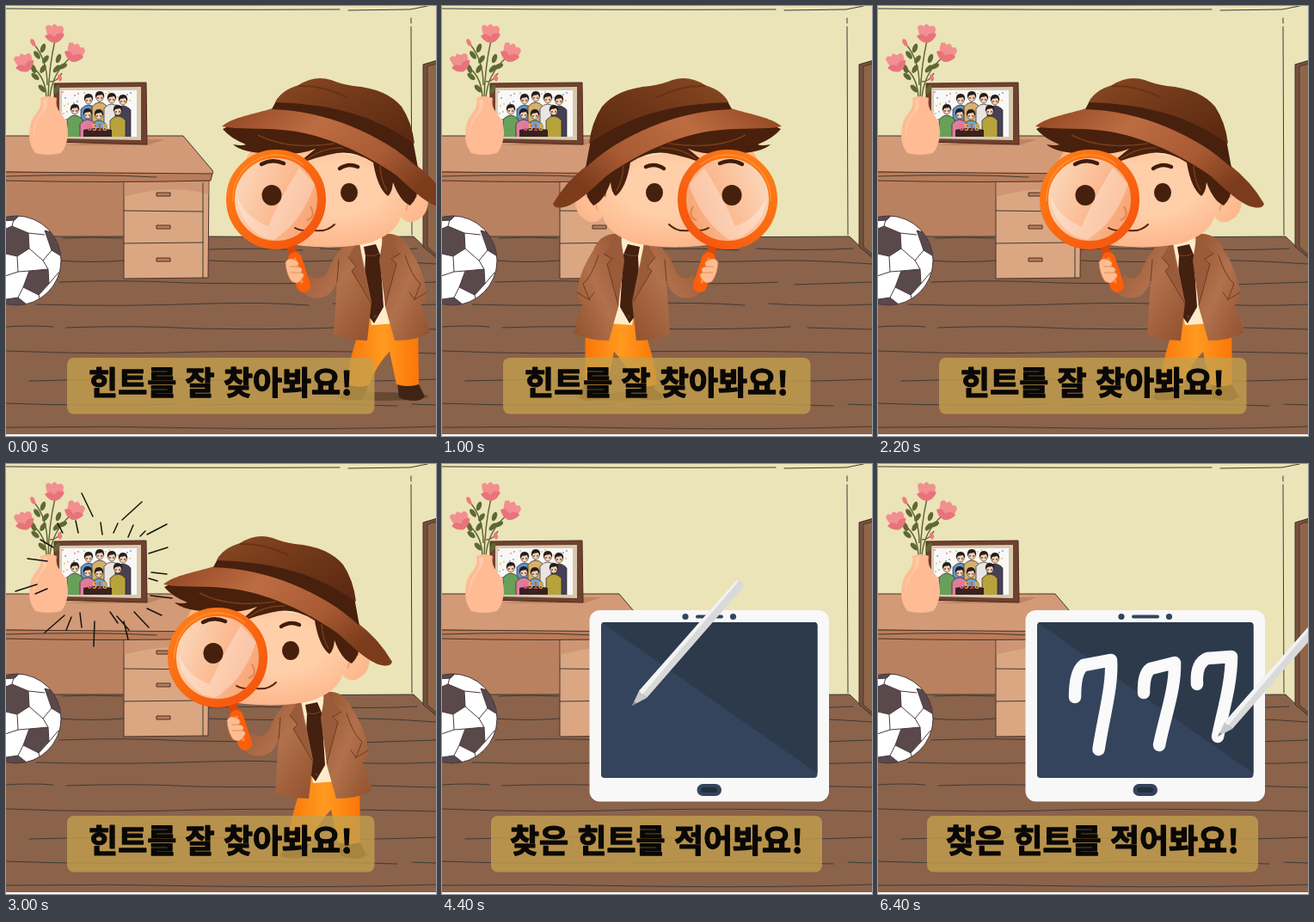
Recreate the animation shown at these times as an HTML page. Size 500x500 px, loop 7.2 s.

```html
<!DOCTYPE html>
<html lang="ko">
<head>
<meta charset="utf-8">
<title>힌트 찾기</title>
<style>
html, body { margin: 0; width: 100%; height: 100%; overflow: hidden; background: #fff; }
svg { display: block; width: 100vw; height: 100vh; }
.line { fill: none; stroke: #3b3c36; stroke-width: 1; stroke-linecap: round; stroke-linejoin: round; }
.thick { stroke: #3f1c0a; stroke-width: 4.5; }
.smile { stroke: #54220e; stroke-width: 2; }
.ink path { fill: none; stroke: #fafafa; stroke-width: 14.5; stroke-linecap: round; stroke-linejoin: round; }
text { font-family: "Noto Sans CJK KR", "Noto Sans CJK", "Noto Sans CJK JP", sans-serif; text-anchor: middle; }
.caption { font-size: 37px; font-weight: 900; fill: #0a0806; stroke: #0a0806; stroke-width: 1.3; stroke-linejoin: round; }
.banner { fill: #c4a04e; fill-opacity: .78; }
</style>
</head>
<body>
<svg viewBox="0 0 500 500" preserveAspectRatio="none">
<defs>
  <linearGradient id="crown" x1="0" y1="0" x2="1" y2=".8"><stop stop-color="#8a4a24"/><stop offset=".45" stop-color="#743a1a"/><stop offset="1" stop-color="#5c2a12"/></linearGradient>
  <linearGradient id="brim" x1="0" y1="0" x2="1" y2=".5"><stop stop-color="#8f4420"/><stop offset=".4" stop-color="#bd6c42"/><stop offset=".75" stop-color="#a85a33"/><stop offset="1" stop-color="#7c3c1c"/></linearGradient>
  <linearGradient id="coat" x1="0" y1="0" x2="1" y2="1"><stop stop-color="#95542f"/><stop offset=".5" stop-color="#b1714c"/><stop offset="1" stop-color="#92502d"/></linearGradient>
  <radialGradient id="skin" cx=".5" cy=".45" r=".6"><stop offset=".4" stop-color="#ffcfa9"/><stop offset="1" stop-color="#fdb286"/></radialGradient>
  <linearGradient id="glass" x1="0" y1=".3" x2="1" y2=".7"><stop stop-color="#fbd9bd"/><stop offset=".45" stop-color="#fbbf98"/><stop offset="1" stop-color="#f7a271"/></linearGradient>
  <linearGradient id="ring" x1="0" y1="0" x2="1" y2="1"><stop stop-color="#ff8018"/><stop offset="1" stop-color="#f4520c"/></linearGradient>
  <linearGradient id="pants" x1="0" y1="0" x2="1" y2="0"><stop stop-color="#fb7608"/><stop offset=".5" stop-color="#ff9a20"/><stop offset="1" stop-color="#fb7608"/></linearGradient>
  <clipPath id="screen"><rect x="185" y="184" width="251.500" height="181" rx="4"/></clipPath>
  <clipPath id="ballClip"><circle cx="12" cy="296" r="52"/></clipPath>
  <clipPath id="photoClip"><rect x="65" y="98" width="87" height="54"/></clipPath>
  <clipPath id="stage"><rect width="500" height="498"/></clipPath>
  <g id="flower">
    <path fill="#f29090" d="M-10-9Q-6-13-3-9Q0-15 4-9Q9-12 11-7Q11 5 2 9Q-8 8-10-9Z"/>
    <path fill="#e8737a" d="M-11 2Q-5-3 0 3Q5-4 12 0Q8 9 1 10Q-7 9-11 2Z"/>
  </g>
</defs>

<g clip-path="url(#stage)">
  <!-- room -->
  <rect width="500" height="500" fill="#8b624a"/>
  <path fill="#ebe4b8" d="M0 0H500V293L474 268H0Z"/>
  <path class="line" d="M0 3Q200 5 388 4M398 5L470 4L490 0M471 14V20M471 24L472 266M236 268Q350 269 474 268L500 293"/>
  <path fill="#76503d" stroke="#40302b" d="M485 68L502 63V293L485 280Z"/>
  <path fill="#8f6548" stroke="#40302b" stroke-width=".8" d="M490 70L502 67V290L490 280Z"/>
  <path class="line" d="M66 270Q100 268 135 270M236 283Q300 281 345 284M365 282Q420 285 478 282M62 296Q100 299 137 296M236 296Q300 299 384 296Q430 295 500 300M0 323L15 322M62 321Q140 318 210 322Q340 324 390 321M410 324L500 321M35 347Q130 350 236 346Q300 344 352 348M380 346Q430 350 500 347M0 373Q30 371 55 373M70 374Q150 371 220 375Q330 377 405 373M425 374L500 376M0 401Q120 406 230 402Q350 400 500 404M27 436Q180 432 300 436Q400 438 500 434M0 462Q110 466 200 463M220 464Q350 461 455 465M472 463L500 464M0 490Q120 488 240 491Q380 493 500 489"/>

  <!-- desk -->
  <rect y="200" width="138" height="68" fill="#b98160"/>
  <path class="line" d="M0 268H137"/>
  <path fill="#dba682" stroke="#4a332a" d="M137 203H236L235 316L137 317Z"/>
  <path fill="#bd8362" d="M137 203H236V219Q190 206 137 222Z" opacity=".45"/>
  <path class="line" d="M137 238L229 239M137 276L229 275M229 206V316"/>
  <path fill="#b97b5c" stroke="#4a332a" d="M175 217H191V221H175ZM175 255H191V259H175ZM175 293H191V297H175Z"/>
  <path fill="#d29a77" stroke="#4a332a" d="M-2 151H206L240 191Q242 194 239 196L-2 193Z"/>
  <path fill="#ba7c59" stroke="#4a332a" d="M-2 193L240 195L238 203Q120 206-2 203Z"/>
  <path class="line" d="M0 198Q100 195 175 199"/>
  <path fill="#ad7557" d="M68 162L165 162L185 155H160Z" opacity=".55"/>

  <!-- photo -->
  <path fill="#70412f" stroke="#4b2a20" d="M56 90L163 89L164 161L56 158Z"/>
  <path fill="#d8c9ad" d="M62 95L157 94V156L62 154Z"/>
  <g clip-path="url(#photoClip)">
    <rect x="65" y="98" width="87" height="54" fill="#faf8f6"/>
    <g id="dots"></g><g id="people"></g>
    <path fill="#392022" d="M90 144Q106 140 123 144V153H90Z"/>
    <text x="106" y="145" font-size="10" font-weight="900"><tspan fill="#ef6d96">0</tspan><tspan fill="#f0b52d">5</tspan><tspan fill="#e24a42">1</tspan><tspan fill="#f0b52d">8</tspan></text>
  </g>

  <!-- vase -->
  <path fill="none" stroke="#626936" stroke-width="1.500" d="M49 107Q50 70 57 40M51 107Q53 78 76 59M47 107Q46 78 25 68M48 92Q48 63 33 45M51 88Q60 88 65 78"/>
  <g id="leaves" fill="#5f6834"></g>
  <use href="#flower" x="56" y="33"/><use href="#flower" transform="translate(79 55) rotate(22)"/><use href="#flower" transform="translate(21 67) rotate(-18)"/>
  <path fill="#ed7a82" d="M28 39Q33 36 35 47Q29 48 28 39ZM63 88Q57 83 62 79Q68 84 63 88Z"/>
  <path fill="#ffbb93" d="M40 107Q49 103 59 107Q57 117 63 124Q73 134 72 150Q70 165 64 171Q49 175 34 171Q27 162 27 150Q27 133 36 124Q42 117 40 107Z"/>
  <path fill="#ffd0b0" d="M43 109Q46 119 38 128Q30 139 32 153Q34 132 44 124Q49 117 48 108Z" opacity=".7"/>

  <!-- ball -->
  <circle cx="12" cy="296" r="52" fill="#fff"/>
  <g clip-path="url(#ballClip)" fill="#5a494b" stroke="#4a3b3d">
    <path d="M-5 261L7 256L26 264L27 282L13 291L-5 287ZM45 261L56 264L66 292L53 284ZM27 308L49 306L50 323L38 336L20 327ZM-8 242H17L10 249L-6 250ZM0 341L14 339L24 347L10 350L-4 348Z"/>
    <path fill="none" d="M7 256L9 248M26 264L45 266M27 282L43 296L53 284M43 296L49 306M13 291L14 309L27 308M14 309L-4 315M50 323L61 310M20 327L14 339M38 336L40 343"/>
  </g>
  <circle cx="12" cy="296" r="52" fill="none" stroke="#453537"/>

  <path id="burst" fill="none" stroke="#17130f" stroke-width="1.500" stroke-linecap="round" d="M88 34L101 61M81 66L84 80M110 68L112 82M125 80L130 69M135 65L158 44M142 85L148 71M156 84L162 78M164 82L187 70M166 104L188 97M169 126L187 128M166 133L176 136M168 153L193 156M164 168L181 176M149 172L166 190M129 177L143 193M137 183L142 204M121 172L130 185M103 183L102 212M86 173L88 190M76 178L70 193M68 176L45 196M48 145L34 151M36 140L11 148M48 113L25 110M55 97L40 88M66 80L60 69"/>

  <g id="boy">
    <ellipse cx="370" cy="454" rx="53" ry="5" fill="#4f3a20" opacity=".6"/>
    <path fill="#3f2314" d="M331 438L354 439L347 457Q333 460 321 457Q320 450 331 446ZM387 438H411L418 452Q419 458 408 459Q395 459 389 455Z"/>
    <path fill="url(#pants)" d="M349 362H411L412 440Q399 444 386 440L378 402Q364 415 354 441Q342 445 328 440Q331 405 349 362Z"/>
    <path fill="#ffecca" d="M340 270L374 265L386 369L357 371Z"/>
    <path fill="#43200f" d="M348 280L362 277L367 289L371 350L360 369L347 352L350 291Z"/>
    <path fill="none" stroke="#74462a" d="M350 290Q358 292 366 288"/>
    <path fill="url(#coat)" d="M327 277Q314 287 305 311Q296 321 286 313L272 327Q283 344 303 338Q313 333 317 320L313 382Q331 389 352 389L357 344L342 271Z"/>
    <path fill="url(#coat)" d="M369 265Q394 262 402 284Q417 306 421 331Q421 344 415 347L425 380Q410 389 384 389L373 350Z"/>
    <path fill="#995b3a" d="M342 271L330 292L339 303L334 308L357 346L346 297ZM371 265L390 288L380 294L386 300L373 348L366 296Z"/>
    <path class="line" style="stroke:#6f3a1f" d="M330 292L339 303L334 308L357 346M390 288L380 294L386 300L373 348M317 320L319 295M396 290Q404 315 414 323L407 341L401 333M421 333L406 342"/>
    <circle cx="361" cy="361" r="1.700" fill="#5a3423"/>

    <path fill="url(#skin)" d="M225 158C194 190 196 244 233 267C264 284 333 283 359 274C383 264 389 253 391 245Q400 256 412 248C425 241 427 218 415 210Q401 202 388 223L380 180Z"/>
    <path fill="none" stroke="#f2a273" stroke-width="2" d="M397 238Q400 224 411 221"/>
    <path fill="#48200c" d="M184 143C210 130 250 132 290 142C340 152 384 183 412 206Q411 224 402 232Q390 227 382 205Q381 217 376 221Q364 212 359 182Q338 168 317 171Q292 175 268 186Q282 174 292 166Q272 174 244 172Q206 171 196 161Q207 163 211 161Q193 154 184 143Z"/>
    <path fill="none" stroke="#763c1a" stroke-width="1.500" d="M225 150Q260 168 314 160M324 165Q301 164 282 178M367 186Q368 203 375 215"/>
    <path fill="url(#brim)" d="M183 140C196 129 220 126 242 119C305 114 364 150 408 184Q434 204 449 230Q447 236 437 234C421 231 403 212 386 197C346 169 302 150 262 145C230 141 202 144 183 140Z"/>
    <path fill="#48200e" d="M241 120L248 107Q327 108 404 150L411 188C368 148 303 122 241 120Z"/>
    <path fill="url(#crown)" d="M245 112Q252 98 272 92Q291 80 310 86Q322 91 336 93Q374 96 392 117Q404 135 407 160C354 123 303 114 245 112Z"/>
    <path fill="none" stroke="#5a2a14" stroke-width="2" d="M272 93Q301 92 328 106" opacity=".6"/>

    <ellipse cx="331" cy="217" rx="10" ry="11" fill="#45200c"/>
    <path class="line thick" d="M320 189Q330 182 341 187"/>
    <path class="line smile" d="M291 261Q305 263 314 254"/>

    <circle cx="246" cy="225" r="51" fill="url(#glass)"/>
    <path fill="#fff" opacity=".3" d="M201 222Q202 252 231 269L243 272Q276 252 291 207L273 188Q252 221 237 256Q211 247 201 222Z"/>
    <ellipse cx="241" cy="220" rx="11.500" ry="12" fill="#45200c"/>
    <path class="line thick" d="M229 184Q242 177 255 183"/>
    <path fill="none" stroke="#e58350" stroke-width="2" d="M286 233Q293 245 282 249"/>
    <path class="line smile" d="M268 258Q277 263 290 260"/>
    <circle cx="246" cy="225" r="53" fill="none" stroke="url(#ring)" stroke-width="10"/>
    <path fill="none" stroke="#ffa04a" stroke-width="1.500" d="M196 227A50 50 0 0 1 278 185" opacity=".65"/>
    <path fill="none" stroke="#d9480c" stroke-width="10" d="M263 280L268 293"/>
    <path fill="none" stroke="#fb5f0c" stroke-width="16" stroke-linecap="round" d="M268 294L278 325"/>
    <path fill="none" stroke="#ff8c38" stroke-width="3" stroke-linecap="round" d="M268 294L276 321"/>
    <path fill="#fdbd90" stroke="#e38d58" stroke-width=".8" d="M257 298Q261 291 269 296Q275 299 270 303Q279 304 275 310Q281 312 276 317Q272 325 264 320Q258 312 257 298Z"/>
    <path fill="none" stroke="#e38d58" d="M262 303H271M263 310H275"/>
  </g>

  <g id="tablet">
    <rect x="171.500" y="170" width="278.500" height="222.500" rx="12" fill="#f8f8f8"/>
    <g clip-path="url(#screen)"><path fill="#34445d" d="M185 184H437V365H185Z"/><path fill="#2c3a4c" d="M185 184H437V360Z"/></g>
    <g fill="#34445d"><circle cx="283" cy="177.500" r="3.600"/><circle cx="338.500" cy="177.500" r="3.600"/><rect x="295" y="175.500" width="32" height="4" rx="2"/><rect x="296.500" y="372" width="28.500" height="14" rx="7"/></g>
    <rect x="301.500" y="376" width="18.500" height="6" rx="3" fill="#222e3f"/>
    <g class="ink">
      <path d="M229 271C229 255 231 240 239 234L271 228C273 258 262 295 256.500 332"/>
      <path d="M309 266C309 253 310 243 317 238L345 231C346 262 333 296 327 327"/>
      <path d="M371 256C370 241 373 230 383 226L411 224C411 255 401 288 395 317"/>
    </g>
    <g id="pen">
      <path fill="#c9c9c9" d="M0 0L8-17L17-9Z"/>
      <path fill="#d9d9d9" d="M8-17L119-143Q123-148 127-144Q131-140 127-135L17-9Z"/>
      <path fill="#f3f3f3" d="M8-17L119-143Q122-146 124-145L12-13Z"/>
      <path fill="#888" d="M0 0L2-5L5-3Z"/>
    </g>
  </g>

  <rect id="banner" class="banner" y="409" height="65.500" rx="8"/>
  <text id="caption" class="caption" x="249.500" y="451.500"></text>
</g>
</svg>
<script>
const $ = id => document.getElementById(id);
const make = (parent, tag, attrs) => {
  const el = document.createElementNS("http://www.w3.org/2000/svg", tag);
  for (const k in attrs) el.setAttribute(k, attrs[k]);
  parent.append(el);
};

const confetti = ["#e98fae", "#7ea5d8", "#efc75c", "#a8cf9a"];
for (let i = 0; i < 44; i++)
  make($("dots"), "circle", { cx: 66 + i * 37 % 86, cy: 100 + i * 23 % 34, r: 1.1, fill: confetti[i % 4] });

// head x, head y, shirt
const people = [[96, 109, "#5f93c8"], [109, 106, "#d5b26c"], [123, 108, "#e9e5e2"], [136, 110, "#454055"],
  [80, 121, "#68a05a"], [130, 122, "#b8a23b"], [108, 127, "#6aa8cc"], [95, 126, "#dd7f9c"]];
for (const [x, y, shirt] of people) {
  make($("people"), "path", { d: `M${x - 9} 153V${y + 11}Q${x} ${y + 1} ${x + 9} ${y + 11}V153Z`, fill: shirt, stroke: "#2d2420", "stroke-width": .7 });
  make($("people"), "ellipse", { cx: x, cy: y, rx: 4.2, ry: 5, fill: "#f7cfaf", stroke: "#2d2420", "stroke-width": .6 });
  make($("people"), "path", { d: `M${x - 5} ${y + 1}Q${x - 6} ${y - 7} ${x} ${y - 7}Q${x + 6} ${y - 7} ${x + 5} ${y + 1}L${x + 3} ${y - 3}L${x - 3} ${y - 2}Z`, fill: "#241d1d" });
  make($("people"), "path", { d: `M${x - 3} ${y + 1}h2m2 0h2`, stroke: "#241d1d", "stroke-width": 1.2 });
}

for (const [x, y, turn] of [[46, 62, 35], [36, 57, -35], [43, 73, 30], [59, 73, 45], [34, 82, -50], [42, 96, -45], [59, 97, 30], [61, 61, 20], [66, 70, 65], [32, 73, -20], [43, 49, 20]])
  make($("leaves"), "ellipse", { cx: x, cy: y, rx: 2.8, ry: 5.5, transform: `rotate(${turn} ${x} ${y})` });

const LOOP = 7200, REST = 1400, WRITE = 4400;
const strokes = [...document.querySelectorAll(".ink path")];
const lengths = strokes.map(s => s.getTotalLength());
const written = [0, .42, .85, 1.4, 2.4, 3];
const burstScale = [.72, .86, 1];

function boyPose(t) {
  if (t >= REST) return "";
  const step = Math.floor(t / 200);
  return step < 4 ? `translate(${68 - 67 * step} 0)`
    : `translate(${578 + 67 * (step - 5)} 0) scale(-1 1)`;
}

function showBurst(t) {
  const scale = t >= 1600 && t < 3200 ? burstScale[Math.floor((t - 1600) % 1000 / 200)] : 0;
  $("burst").style.display = scale ? "" : "none";
  $("burst").setAttribute("transform", `translate(108 126) scale(${scale || 1}) translate(-108 -126)`);
}

function write(t) {
  const progress = written[Math.min(5, Math.floor((t - WRITE) / 400))];
  let tip = { x: 221, y: 281 };
  strokes.forEach((s, i) => {
    const part = Math.max(0, Math.min(1, progress - i));
    s.style.display = part ? "" : "none";
    s.style.strokeDasharray = part < 1 ? `${part * lengths[i]} 999` : "none";
    if (part) tip = s.getPointAtLength(part * lengths[i]);
  });
  $("pen").setAttribute("transform", `translate(${tip.x} ${tip.y})`);
}

function draw(t) {
  const writing = t >= WRITE;
  $("boy").style.display = writing ? "none" : "";
  $("tablet").style.display = writing ? "" : "none";
  $("boy").setAttribute("transform", boyPose(t));
  showBurst(t);
  if (writing) write(t);
  $("banner").setAttribute("x", writing ? 57 : 71);
  $("banner").setAttribute("width", writing ? 385 : 357.5);
  $("caption").textContent = writing ? "찾은 힌트를 적어봐요!" : "힌트를 잘 찾아봐요!";
}

const start = performance.now();
function tick() {
  draw((performance.now() - start) % LOOP);
  requestAnimationFrame(tick);
}
tick();
</script>
</body>
</html>
```
